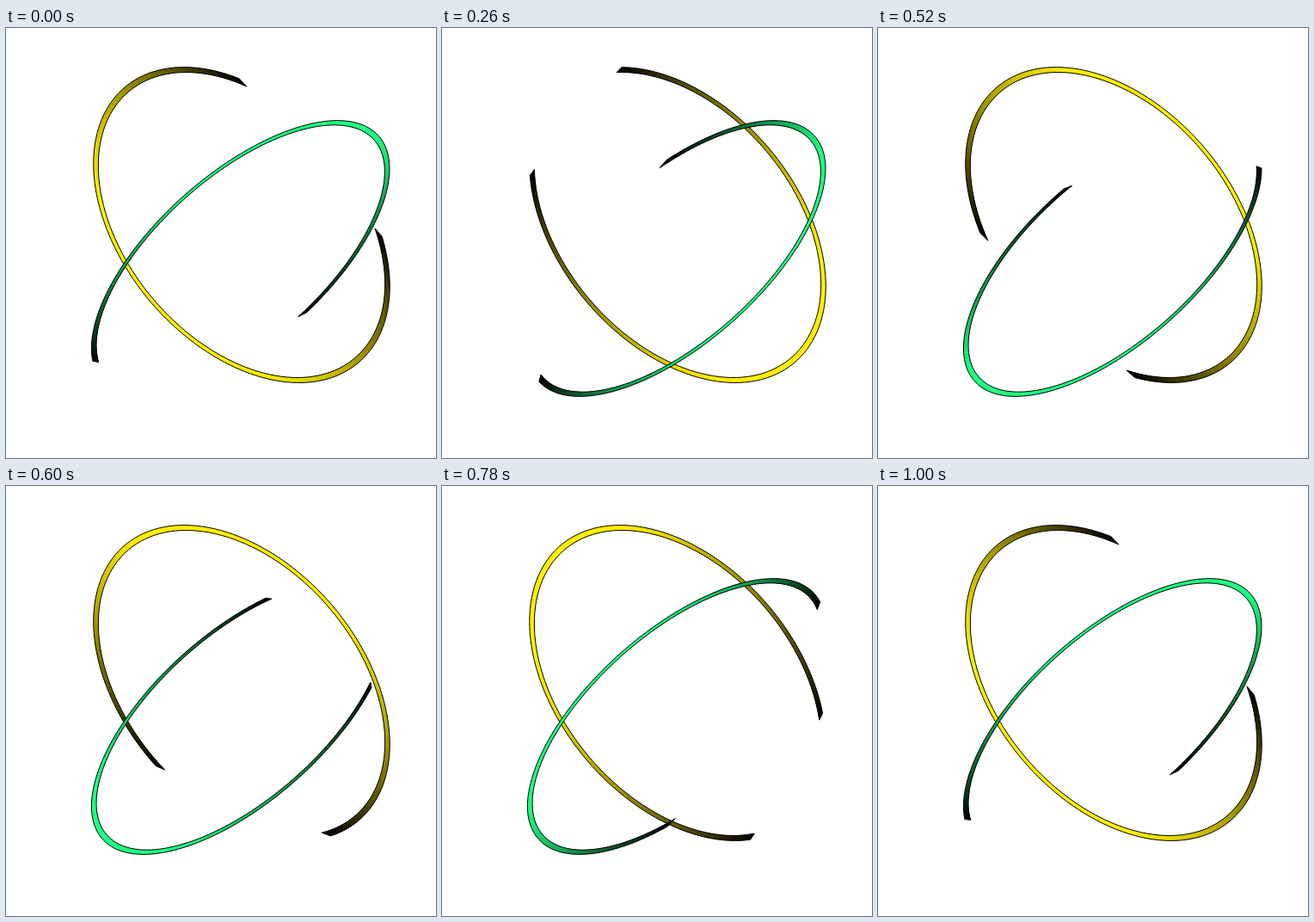
An HTML page with a canvas that plays this animation: 500 px wide and 500 px high, repeating every 1.02 s.

```html
<!DOCTYPE html>
<html lang="en">
<head>
<meta charset="utf-8">
<title>Orbiting arcs</title>
<style>
  html, body { margin: 0; width: 100%; height: 100%; overflow: hidden; background: #fff; }
  canvas { display: block; }
</style>
</head>
<body>
<canvas id="stage" width="500" height="500"></canvas>
<script>
const ctx = document.getElementById('stage').getContext('2d');
const RAD = Math.PI / 180;
const LOOP = 1020, STEP = 20, TURN = 1000;
const SEGMENTS = 120;
const HALF_WIDTH = 0.0165; // relative to the ring radius

// Angles in degrees; gap values are half the opening on each edge.
const rings = [
  { x: 274, y: 229, a: 206.6, b: 136.4, tilt: 49.6, start: 267.4, dir: -1,
    gapOuter: 36.2, gapInner: 33.2, color: [255, 238, 0] },
  { x: 272.7, y: 268, a: 211.2, b: 96.7, tilt: -41.6, start: 140.2, dir: 1,
    gapOuter: 54.4, gapInner: 51.6, color: [32, 255, 128] }
];

function point(ring, angle, scale) {
  const u = ring.a * scale * Math.cos(angle * RAD);
  const v = ring.b * scale * Math.sin(angle * RAD);
  const c = Math.cos(ring.tilt * RAD), s = Math.sin(ring.tilt * RAD);
  return [ring.x + u * c - v * s, ring.y + u * s + v * c];
}

function edge(ring, center, gap, scale) {
  const span = 360 - 2 * gap;
  return Array.from({ length: SEGMENTS + 1 }, (_, i) =>
    point(ring, center + gap + span * i / SEGMENTS, scale));
}

function trace(points) {
  ctx.beginPath();
  points.forEach(p => ctx.lineTo(p[0], p[1]));
  ctx.closePath();
}

function drawRing(ring, time) {
  const center = ring.start + ring.dir * 360 * time / TURN;
  const outer = edge(ring, center, ring.gapOuter, 1 + HALF_WIDTH);
  const inner = edge(ring, center, ring.gapInner, 1 - HALF_WIDTH);

  for (let i = 0; i < SEGMENTS; i++) {
    const light = Math.min(1, 1.12 * Math.sin(Math.PI * (i + 0.5) / SEGMENTS));
    const next = Math.min(i + 2, SEGMENTS); // overlap hides the seams
    ctx.fillStyle = `rgb(${ring.color.map(v => Math.round(v * light)).join(',')})`;
    trace([outer[i], outer[next], inner[next], inner[i]]);
    ctx.fill();
  }

  ctx.strokeStyle = '#000';
  ctx.lineWidth = 1;
  trace([...outer, ...inner.reverse()]);
  ctx.stroke();
}

function draw(now) {
  const time = Math.floor((now % LOOP) / STEP) * STEP;
  ctx.fillStyle = '#fff';
  ctx.fillRect(0, 0, 500, 500);
  rings.forEach(ring => drawRing(ring, time));
}

let origin = null;
function tick(now) {
  if (origin === null) origin = now;
  draw(now - origin);
  requestAnimationFrame(tick);
}
draw(0);
requestAnimationFrame(tick);
</script>
</body>
</html>
```
